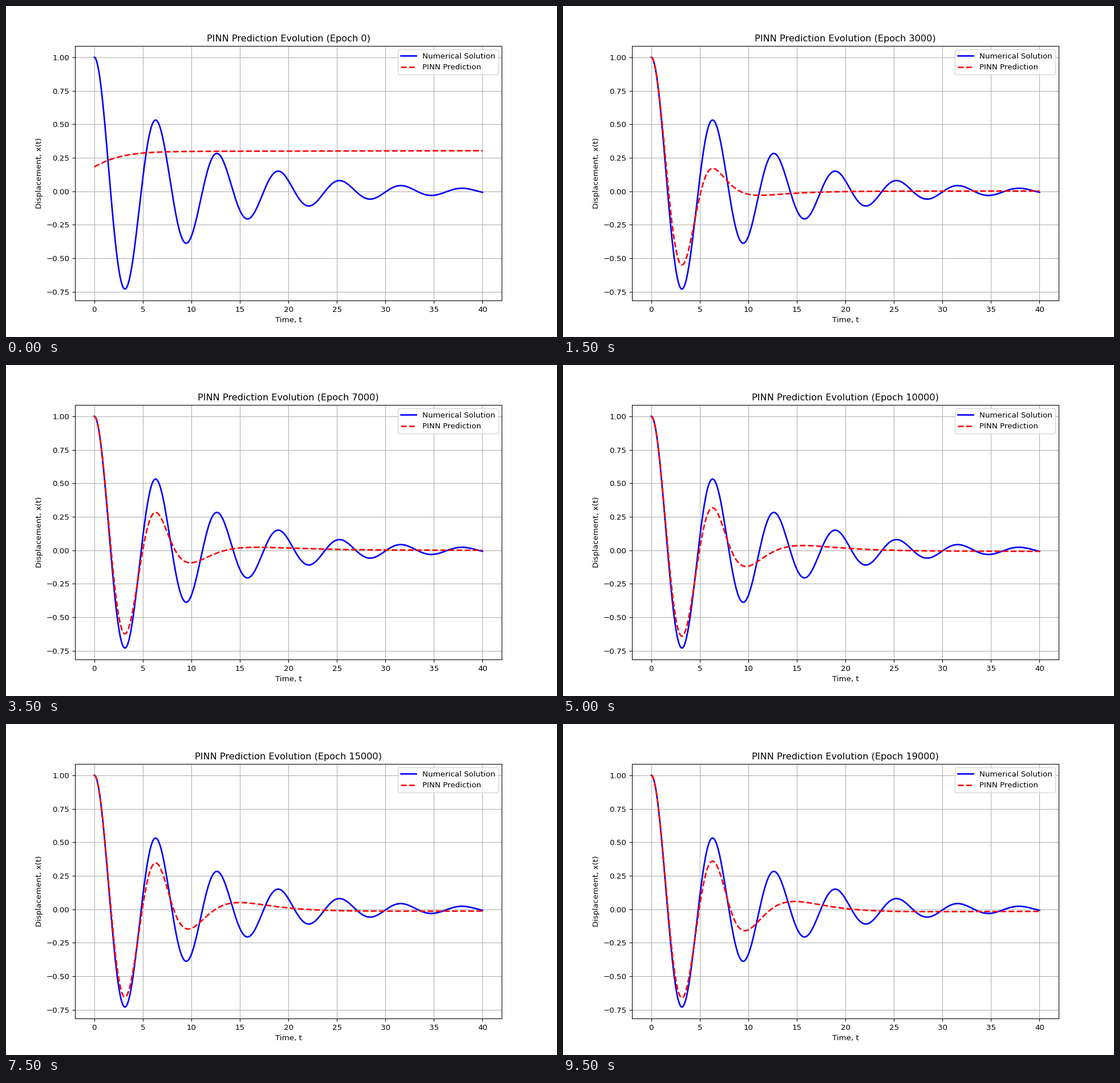
A matplotlib script for the animation above (10 s loop, 966x580 px).

```python
import numpy as np
import matplotlib.pyplot as plt
from matplotlib.animation import FuncAnimation

WIDTH, HEIGHT, DPI = 966, 580, 96.6
FRAMES, INTERVAL = 20, 500
DECAY = 0.1
OMEGA = np.sqrt(1 - DECAY**2)

t = np.linspace(0, 40, 1000)


def exact_solution():
    """Damped oscillator released from rest at x = 1."""
    phase = OMEGA * t
    return np.exp(-DECAY * t) * (np.cos(phase) + DECAY / OMEGA * np.sin(phase))


def slowed_time(start, span):
    """Follows t up to start, then eases towards start + span."""
    late = np.maximum(t - start, 0)
    return np.minimum(t, start) + span * (1 - np.exp(-late / span))


def prediction(step):
    """Oscillation that is overdamped and stalls late; both errors shrink with training."""
    if step == 0:
        return 0.297 + 0.00015 * t - 0.1725 / (np.exp(0.52 * t) + 0.5)
    extra = 0.0065 + 0.067 / step
    lag = 1 / (step + 1)
    phase = OMEGA * slowed_time(8.4 - 10 * lag, 9.2 - 12 * lag)
    damping = DECAY * phase + extra * phase**2
    rate = DECAY + 2 * extra * phase
    return np.exp(-damping) * (np.cos(phase) + rate * np.sin(phase))


fig, ax = plt.subplots(figsize=(WIDTH / DPI, HEIGHT / DPI), dpi=DPI)
ax.plot(t, exact_solution(), "b-", lw=2, label="Numerical Solution")
(predicted,) = ax.plot(t, prediction(0), "r--", lw=2, label="PINN Prediction")
ax.set_xlabel("Time, t")
ax.set_ylabel("Displacement, x(t)")
ax.legend(loc="upper right")
ax.grid(True)


def update(step):
    predicted.set_ydata(prediction(step))
    ax.set_title(f"PINN Prediction Evolution (Epoch {step * 1000})")
    return (predicted,)


anim = FuncAnimation(fig, update, frames=FRAMES, interval=INTERVAL, repeat=True, repeat_delay=0)
plt.show()
```
